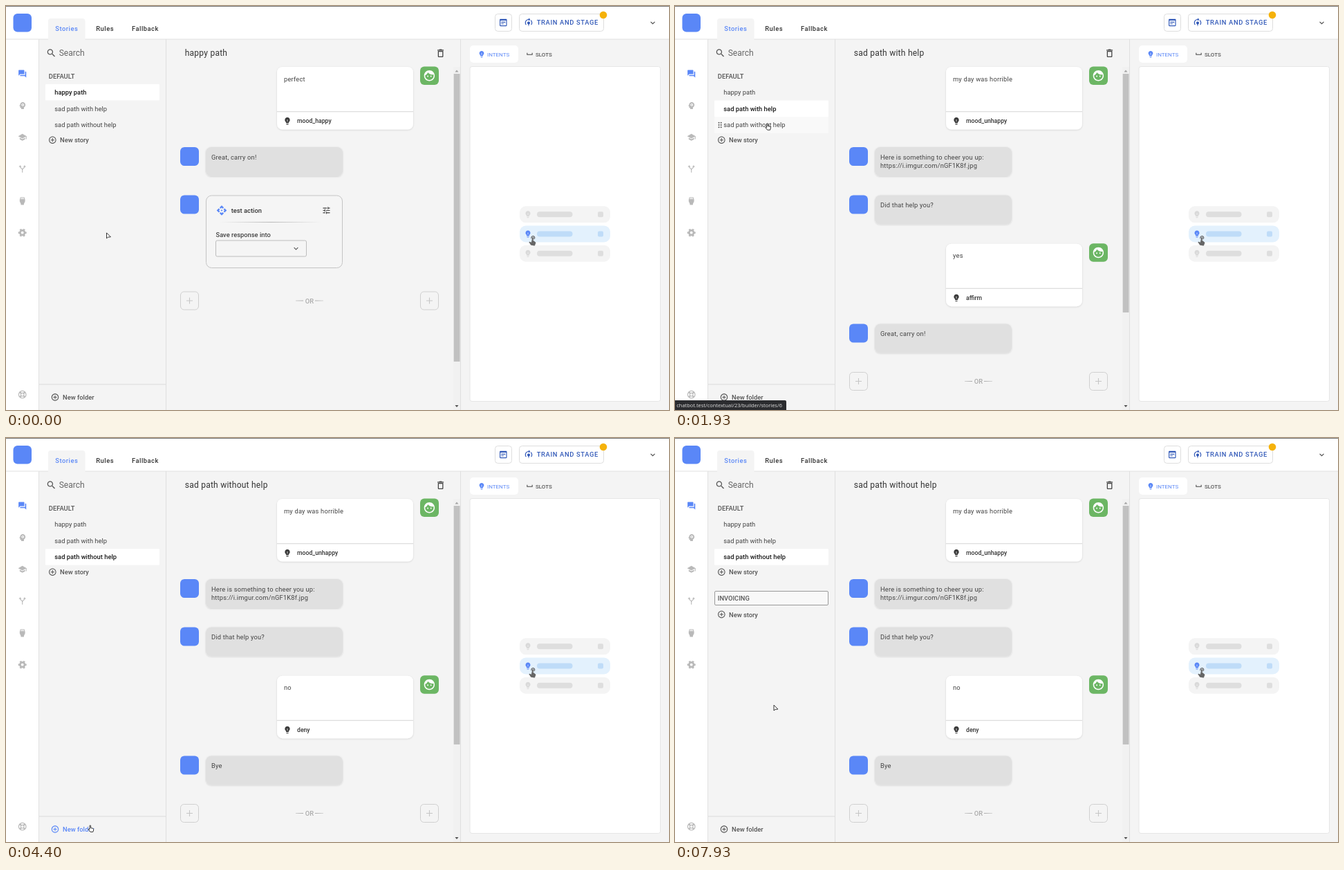
Write an HTML page that moves like this. It is 959 px wide and 584 px high and loops after 8000 ms.

```html
<!DOCTYPE html>
<html lang="en">
<head>
<meta charset="utf-8">
<title>Story builder</title>
<style>
  html, body { margin: 0; width: 100%; height: 100%; overflow: hidden; background: #f4f4f4; }
  svg { display: block; width: 100vw; height: 100vh; }
  text { font-family: Roboto, sans-serif; font-size: 9.33px; white-space: pre; }
  .m { font-weight: 500; }
  .chat text { letter-spacing: .18px; }
  .chat .tag { font-size: 8.67px; font-weight: 500; letter-spacing: 0; }
  .chat .m { letter-spacing: 0; }
  .status { font-family: "Noto Sans", sans-serif; font-size: 7.4px; }
</style>
</head>
<body>
<svg id="stage" viewBox="0 0 959 584" xmlns="http://www.w3.org/2000/svg"></svg>
<script>
const BLUE = '#5a87f7', NAVY = '#3259b8', PALE = '#b9b9b9';

const icons = {
  chat: 'M21 6h-2v9H6v2c0 .55.45 1 1 1h11l4 4V7c0-.55-.45-1-1-1zm-4 6V3c0-.55-.45-1-1-1H3c-.55 0-1 .45-1 1v14l4-4h10c.55 0 1-.45 1-1z',
  head: 'M13 3C9.23 3 6.19 5.95 6 9.66l-1.92 2.53c-.24.31 0 .81.42.81H6v3c0 1.1.9 2 2 2h1v3h7v-4.69c2.37-1.12 4-3.51 4-6.31 0-3.86-3.12-7-7-7zM13 6.5a3.5 3.5 0 1 0 .01 0zM13 8.6a1.4 1.4 0 1 1-.01 0z',
  cap: 'M5 13.18v4L12 21l7-3.82v-4L12 17l-7-3.82zM12 3L1 9l11 6 9-4.91V17h2V9L12 3z',
  fork: 'M11 22V15Q11 13 8 11Q5.600 9.500 5.200 7H2.500L6.200 3 10 7H7.300Q8 9 10 10.200 11.300 11 12 12 12.700 11 14 10.200 16 9 16.700 7H14L17.800 3 21.500 7H18.800Q18.400 9.500 16 11 13 13 13 15V22z',
  plug: 'M18 7V4c0-1.1-.9-2-2-2H8c-1.1 0-2 .9-2 2v3H5v6l3 6v3h8v-3l3-6V7h-1zM8 4h8v3h-2V5h-1v2h-2V5h-1v2H8V4z',
  search: 'M15.5 14h-.79l-.28-.27C15.41 12.59 16 11.11 16 9.5 16 5.91 13.09 3 9.5 3S3 5.91 3 9.5 5.91 16 9.5 16c1.61 0 3.09-.59 4.23-1.57l.27.28v.79l5 4.99L20.49 19l-4.99-5zm-6 0C7.01 14 5 11.99 5 9.5S7.01 5 9.5 5 14 7.01 14 9.5 11.99 14 9.5 14z',
  bin: 'M6 19c0 1.1.9 2 2 2h8c1.1 0 2-.9 2-2V7H6v12zM8 9h8v10H8V9zm7.5-5l-1-1h-5l-1 1H5v2h14V4z',
  tune: 'M3 17v2h6v-2H3zM3 5v2h10V5H3zm10 16v-2h8v-2h-8v-2h-2v6h2zM7 9v2H3v2h4v2h2V9H7zm14 4v-2H11v2h10zm-6-4h2V7h4V5h-4V3h-2v6z',
  face: 'M7.75 13a1.25 1.25 0 1 0 2.5 0a1.25 1.25 0 1 0-2.5 0zM13.75 13a1.25 1.25 0 1 0 2.5 0a1.25 1.25 0 1 0-2.5 0zM12 2C6.48 2 2 6.48 2 12s4.48 10 10 10 10-4.48 10-10S17.52 2 12 2zm0 18c-4.41 0-8-3.59-8-8 0-.29.02-.58.05-.86 2.36-1.05 4.23-2.98 5.21-5.37C11.07 8.33 14.05 10 17.42 10c.78 0 1.53-.09 2.25-.26.21.71.33 1.47.33 2.26 0 4.41-3.59 8-8 8z',
  slot: 'M18 9v4H6V9H4v6h16V9z',
  down: 'M16.59 8.59L12 13.17 7.41 8.59 6 10l6 6 6-6z',
  note: 'M19 3H5c-1.11 0-2 .9-2 2v14c0 1.1.89 2 2 2h14c1.1 0 2-.9 2-2V5c0-1.1-.89-2-2-2zm0 16H5V7h14v12zm-2-7H7v-2h10v2zm-4 4H7v-2h6v2z',
  api: 'M14 12l-2 2-2-2 2-2 2 2zm-2-6l2.12 2.12 2.5-2.5L12 1 7.38 5.62l2.5 2.5L12 6zm-6 6l2.12-2.12-2.5-2.5L1 12l4.62 4.62 2.5-2.5L6 12zm12 0l-2.12 2.12 2.5 2.5L23 12l-4.62-4.62-2.5 2.5L18 12zm-6 6l-2.12-2.12-2.5 2.5L12 23l4.62-4.62-2.5-2.5L12 18z',
  add: 'M13 7h-2v4H7v2h4v4h2v-4h4v-2h-4V7zm-1-5C6.48 2 2 6.48 2 12s4.48 10 10 10 10-4.48 10-10S17.52 2 12 2zm0 18c-4.41 0-8-3.59-8-8s3.59-8 8-8 8 3.59 8 8-3.59 8-8 8z',
  enter: 'M19 7v4H5.83l3.58-3.59L8 6l-6 6 6 6 1.41-1.41L5.83 13H21V7z',
  train: 'M15.5 13.5c0 2-2.5 3.5-2.5 5h-2c0-1.5-2.5-3-2.5-5 0-1.93 1.57-3.5 3.5-3.5s3.5 1.57 3.5 3.5zm-2.5 6h-2V21h2v-1.5zm6-6.5c0 1.68-.59 3.21-1.58 4.42l1.42 1.42C20.18 17.27 21 15.23 21 13c0-2.74-1.23-5.19-3.16-6.84l-1.42 1.42C17.99 8.86 19 10.82 19 13zm-3-8l-4-4v3c-4.97 0-9 4.03-9 9 0 2.23.82 4.27 2.16 5.84l1.42-1.42C5.59 16.21 5 14.68 5 13c0-3.86 3.14-7 7-7v3l4-4z',
  bulb: 'M12 2C8.130 2 5 5.130 5 9c0 2.380 1.190 4.470 3 5.740V17c0 .55.45 1 1 1h6c.55 0 1-.45 1-1v-2.260c1.810-1.270 3-3.360 3-5.740 0-3.870-3.130-7-7-7zM11.300 8h1.400v6h-1.400zM9 20h6v1q0 1-1 1h-4q-1 0-1-1z',
  touch: 'M9 11.24V7.5C9 6.12 10.12 5 11.5 5S14 6.12 14 7.5v3.74c1.21-.81 2-2.18 2-3.74C16 5.01 13.99 3 11.5 3S7 5.01 7 7.5c0 1.56.79 2.93 2 3.74zm9.84 4.63l-4.54-2.26c-.17-.07-.35-.11-.54-.11H13v-6c0-.83-.67-1.5-1.5-1.5S10 6.67 10 7.5v10.74l-3.67-.75-1.58 1.13 4.94 4.94c.27.27.65.44 1.06.44h6.79c.75 0 1.33-.55 1.44-1.28l.77-5.47c0-.62-.38-1.16-.91-1.38z'
};

const icon = (name, cx, cy, size, fill, extra = '') =>
  `<path d="${icons[name]}" fill="${fill}" fill-rule="evenodd" ${extra}
    transform="translate(${cx} ${cy}) scale(${size / 24}) ${name === 'touch' ? 'rotate(12)' : ''} translate(-12 -12)"/>`;
const rect = (x, y, w, h, r, fill, extra = '') =>
  `<rect x="${x}" y="${y}" width="${w}" height="${h}" rx="${r}" fill="${fill}" ${extra}/>`;
const text = (x, y, str, fill = '#444', extra = '') =>
  `<text x="${x}" y="${y}" fill="${fill}" ${extra}>${str}</text>`;
const line = (x, y, w, h, fill = '#e2e2e2') => rect(x, y, w, h, 0, fill);
const med = 'class="m"';

// Conversation parts
const userSays = (y, say, tag) =>
  rect(392, y, 197, 90.5, 8, '#fff', 'filter="url(#soft)"') +
  line(392, y + 64, 197, 1.3, '#dedede') +
  text(402, y + 20.5, say) + icon('bulb', 407, y + 78.2, 12.5, '#3a3a3a') +
  text(421, y + 81, tag, '#333', 'class="tag"') +
  rect(599, y - .5, 27, 26.5, 6, '#6cb664') + icon('face', 612.4, y + 12.8, 18.5, '#fff');
const bot = y => rect(252, y, 27, 27, 6, BLUE);
const botSays = (y, ...lines) => bot(y) +
  rect(289, y, 198, 42, 8, '#e0e0e0', 'filter="url(#soft)"') +
  lines.map((s, i) => text(297, y + 17.5 + i * 12, s)).join('');
const plusBox = (x, y) =>
  rect(x, y - 13, 26, 26, 5, 'none', 'stroke="#d0d0d0"') +
  `<path d="M${x + 8.5} ${y}h9m-4.500-4.500v9" stroke="#c6c6c6" stroke-width="1.100"/>`;
const orRow = y => plusBox(252.5, y) + plusBox(599.5, y) +
  rect(419, y - .5, 11, 1, 0, 'url(#fadeL)') + rect(447, y - .5, 12, 1, 0, 'url(#fadeR)') +
  text(439, y + 3.7, 'OR', '#aaa', med + ' text-anchor="middle"');
const action = y => bot(y) +
  rect(289.5, y + .5, 197, 104.5, 8, '#f5f5f5', 'stroke="#c4c4c4"') +
  icon('api', 312, y + 22, 16, BLUE) + text(325.7, y + 25.3, 'test action', '#333', med) +
  icon('tune', 463.5, y + 22, 13.3, '#444') +
  rect(310, y + 38.5, 146, 1, 0, 'url(#fadeM)') +
  text(303.5, y + 60.5, 'Save response into', '#444', med) +
  rect(303.5, y + 65.5, 131, 23, 2, 'none', 'stroke="#bdbdbd"') +
  icon('down', 419.5, y + 77, 13, '#555');
const sadStart = userSays(88, 'my day was horrible', 'mood_unhappy') +
  botSays(204, 'Here is something to cheer you up:', 'https://i.imgur.com/nGF1K8f.jpg') +
  botSays(273.5, 'Did that help you?');
const chats = [
  userSays(88, 'perfect', 'mood_happy') + botSays(204, 'Great, carry on!') + action(273.5) + orRow(426),
  sadStart + userSays(343.7, 'yes', 'affirm') + botSays(459.5, 'Great, carry on!') + orRow(542.5),
  sadStart + userSays(343.7, 'no', 'deny') + botSays(459.5, 'Bye') + orRow(542.5)
];

const stories = ['happy path', 'sad path with help', 'sad path without help'];
const rowTop = i => 113 + 23.6 * i;
const newStory = y => icon('add', 67.3, y, 12.6, '#555') + text(78, y + 3.5, 'New story', '#555', med);
const grip = [0, 1, 2, 3, 4, 5].map(i =>
  `<circle cx="${63.5 + (i % 2) * 3.2}" cy="${-3.2 + (i >> 1) * 3.2}" r="1" fill="#555"/>`).join('');
const row = (s, i) => rect(57, rowTop(i), 165, 23.6, 1, '#fff', `id="bg${i}"`) +
  text(70.3, rowTop(i) + 15.2, s, '#444', `id="row${i}"`);

const gear = `<g fill="none" stroke="${PALE}" transform="translate(23.700 327.700)">
  <circle r="3.300" stroke-width="2.800"/>
  <circle r="5" stroke-width="2" pathLength="12" stroke-dasharray="1" stroke-dashoffset=".5"/></g>`;
const buoy = `<g fill="none" stroke="${PALE}" transform="translate(23.700 561.700)">
  <circle r="5.300" stroke-width="1.200"/><circle r="2.300" stroke-width="1.100"/>
  <circle r="3.800" stroke-width="2.600" pathLength="8" stroke-dasharray=".7 1.300" stroke-dashoffset="-.65"/></g>`;

const pill = (y, on) => rect(743, y - 12, 131, 24, 9, on ? '#e3f1fd' : '#f4f4f4') +
  icon('bulb', 755, y, 12, on ? BLUE : '#d9d9d9') +
  rect(768, y - 4, 51.5, 8, 4, on ? '#bfdcf8' : '#dedede') +
  rect(856, y - 4, 8, 8, 2, on ? '#bfdcf8' : '#dedede');

const stops = (...ops) => ops.map((o, i) =>
  `<stop offset="${i / (ops.length - 1)}" stop-color="#aaa" stop-opacity="${o}"/>`).join('');

const stage = document.getElementById('stage');
stage.innerHTML = `<defs>
    <filter id="soft" x="-5%" y="-10%" width="110%" height="125%">
      <feDropShadow dx="0" dy=".7" stdDeviation=".8" flood-opacity=".16"/></filter>
    <linearGradient id="fadeL">${stops(.5, 1)}</linearGradient>
    <linearGradient id="fadeR">${stops(1, .4)}</linearGradient>
    <linearGradient id="fadeM">${stops(0, .8, 0)}</linearGradient>
  </defs>` +
  // page, header and side rail
  line(0, 0, 959, 584, '#f4f4f4') + line(0, 0, 959, 48, '#fff') + line(0, 48, 47, 536, '#fff') +
  line(0, 47.5, 959, 1) + line(47, 48, 1, 536) + line(231, 48, 1, 536, '#dfdfdf') +
  line(657, 48, 1, 536, '#dfdfdf') + line(0, 0, 959, 1, '#767676') +
  rect(10.5, 11, 26.5, 26.5, 6, BLUE) +
  `<path d="M61 49V22q0-4 4-4h45.500q4 0 4 4V49z" fill="#f4f4f4"/>` +
  [['Stories', 71.3, BLUE], ['Rules', 130.3, '#333'], ['Fallback', 182, '#333']].map(([s, x, c]) =>
    text(x, 36, s, c, med + ' letter-spacing=".5"')).join('') +
  rect(707.5, 11.5, 24, 25, 4, '#fff', 'stroke="#dedede"') + icon('note', 719.3, 24, 14, NAVY) +
  rect(742.5, 11.5, 122, 25, 4, '#fff', 'stroke="#dedede"') + icon('train', 756, 23.6, 14, NAVY) +
  text(767.7, 27.3, 'TRAIN AND STAGE', NAVY, med + ' letter-spacing=".68"') +
  '<circle cx="864" cy="13" r="5.300" fill="#f5b20a"/>' + icon('down', 935.5, 24.3, 13.3, '#444') +
  icon('chat', 23.7, 98, 13.3, BLUE) + icon('head', 23.7, 144, 13.3, PALE) +
  icon('cap', 23.7, 189.8, 13.3, PALE) + icon('fork', 23.7, 235.3, 13.3, PALE) +
  icon('plug', 23.7, 282, 13.3, PALE) + gear + buoy +
  // story list
  icon('search', 65.5, 68, 15.5, '#555') + text(76.7, 72.2, 'Search', '#666', 'font-size="12" style="font-size:12px"') +
  text(61.8, 105, 'DEFAULT', '#555', med) + stories.map(row).join('') +
  `<g id="grip">${grip}</g>` + newStory(193.7) +
  `<g id="folder">` +
    rect(57.5, 221.5, 164, 20, 1.5, '#f8f8f8', 'stroke="#9a9a9a" id="frame"') +
    rect(61.8, 226, 0, 12, 0, '#3390fd', 'id="mark"') + text(61.8, 234.9, '', '#555', 'class="m" id="name"') +
    rect(0, 226, .8, 12, 0, '#5a87f7', 'id="caret"') +
    `<g id="key">${rect(209.5, 226.8, 12, 9.6, 1.5, 'none', 'stroke="#666"')}${icon('enter', 215.5, 231.8, 8.5, '#555')}</g>` +
    newStory(255) +
  `</g>` +
  line(48, 546.5, 183, 1, '#dcdcdc') +
  `<g id="add">${icon('add', 71, 565.6, 12.6, 'inherit')}${text(82, 569, 'New folder', 'inherit', med)}</g>` +
  // conversation
  text(258.7, 72.2, '', '#333', 'id="title" letter-spacing=".25" style="font-size:12px"') +
  icon('bin', 628.6, 68.3, 15.5, '#444') +
  chats.map((c, i) => `<g class="chat" id="chat${i}">${c}</g>`).join('') +
  line(647, 88, 10, 496, '#f1f1f1') + rect(647.7, 98, 8.8, 0, 0, '#c1c1c1', 'id="thumb"') +
  '<path d="M649.500 95.500l2.500-3 2.500 3z" fill="#a3a3a3"/><path d="M649.500 577l2.500 3 2.500-3z" fill="#505050"/>' +
  // right panel
  rect(671, 57, 70, 25, 5, '#fff') + icon('bulb', 688, 69.7, 11.5, BLUE) +
  text(696, 72.6, 'INTENTS', BLUE, 'style="font-size:8px"') +
  icon('slot', 757.5, 69.3, 12.5, '#444') + text(766, 72.6, 'SLOTS', '#333', 'style="font-size:8px"') +
  rect(671, 87.5, 275.5, 484, 3, '#fff', 'stroke="#e6e6e6"') +
  pill(301.3) + pill(329.5, true) + pill(357.7) + icon('touch', 762, 338, 16, '#666') +
  // status bubble and pointer
  `<g id="status">${rect(-3, 570, 0, 18, 2, '#2b2c2f', 'id="bubble"')}${text(2.3, 579.8, '', '#d8d8d8', 'class="status" id="url"')}</g>` +
  `<g id="pointer" fill="#fff" stroke="#111" stroke-width=".85" stroke-linejoin="round">
    <path id="arrow" d="M0 .4V8.300L2 6.700 5.900 6.300z"/>
    <path id="hand" d="M-.8 6V1a.8.8 0 0 1 1.600 0V4l3 .6q1 .3 1 1.200V7.300L4 9.700H.2L-2.600 6.300q0-1.100 1-.8z"/>
  </g>`;

const $ = id => document.getElementById(id);
const show = (id, on) => $(id).setAttribute('display', on ? 'inline' : 'none');
const set = (id, attrs) => { for (const k in attrs) $(id).setAttribute(k, attrs[k]); };
const put = (id, s) => { if ($(id).textContent !== s) $(id).textContent = s; };
const ramp = (t, a, b) => Math.min(1, Math.max(0, (t - a) / (b - a)));

const LOOP = 8000, TICK = 200 / 3;
const home = [145.5, 327.5];
const moves = [ // from, to, x, y
  [200, 667, 145.5, 312.5],
  [933, 1467, 128, 153.5],
  [1800, 1933, 133.5, 169.5],
  [2000, 2067, 131.8, 169.5],
  [2800, 3200, 127.8, 150.5],
  [3333, 4200, 121.8, 559.7],
  [5267, 5533, 143, 385.7]
];
const keys = [6400, 6600, 6800, 6933, 7000, 7267, 7333, 7533, 7667];
const word = 'INVOICING';

function pointerAt(t) {
  let [x, y] = home;
  for (const [a, b, tx, ty] of moves) {
    const p = ramp(t, a, b), e = p * p * (3 - 2 * p);
    x += (tx - x) * e;
    y += (ty - y) * e;
  }
  return [x, y];
}

function render(ms) {
  const t = Math.floor((ms % LOOP + 5) / TICK) * TICK + 1;
  const [x, y] = pointerAt(t);
  const hover = y >= rowTop(0) && y < rowTop(3) ? Math.floor((y - rowTop(0)) / 23.6) : -1;
  const onAdd = y > 550;

  const picked = t < 1733 ? 0 : t < 2667 ? 1 : 2;
  const shown = t < 1800 ? 0 : t < 2733 ? 1 : 2;
  stories.forEach((_, i) => {
    const now = i === picked, was = i === shown;
    set('bg' + i, { opacity: now && was ? 1 : now || was ? .6 : i === hover ? .5 : 0 });
    set('row' + i, { 'font-weight': now || was ? 500 : 400, fill: now || was ? '#1c1c1c' : '#444' });
    show('chat' + i, was);
  });
  put('title', stories[picked]);
  set('thumb', { height: shown ? 345 : 416 });
  show('grip', hover >= 0);
  set('grip', { transform: `translate(0 ${rowTop(hover) + 11.8})` });

  show('status', t >= 1667 && t < 3667);
  set('bubble', { width: t < 1800 ? 322 : 164 });
  put('url', 'chatbot.test/contextual/23/builder/stories/' + (y < rowTop(2) ? 4 : 6));

  const lit = ramp(t, 4200, 4400) - ramp(t, 5267, 5467);
  const mix = [90, 135, 247].map(c => Math.round(85 + (c - 85) * lit));
  set('add', { fill: `rgb(${mix})` });
  for (const el of $('add').children) el.setAttribute('fill', `rgb(${mix})`);

  // folder name field
  const done = t >= 7933, marked = t >= 6133 && t < 6400;
  const typed = keys.filter(k => t >= k).length;
  show('folder', t >= 4933);
  put('name', typed ? word.slice(0, typed) : 'NEW FOLDER');
  set('name', { fill: done ? '#555' : marked ? '#fff' : BLUE });
  show('frame', done);
  show('key', !done);
  const w = t >= 4933 ? $('name').getComputedTextLength() : 0;
  show('mark', marked);
  set('mark', { width: w });
  show('caret', !done && (t < 5433 || t >= 6000) && !marked);
  set('caret', { x: 61.8 + w });

  show('hand', hover >= 0 || onAdd);
  show('arrow', hover < 0 && !onAdd);
  set('pointer', { transform: `translate(${x.toFixed(2)} ${y.toFixed(2)})` });
}

const start = performance.now();
(function frame() {
  render(performance.now() - start);
  requestAnimationFrame(frame);
})();
</script>
</body>
</html>
```
